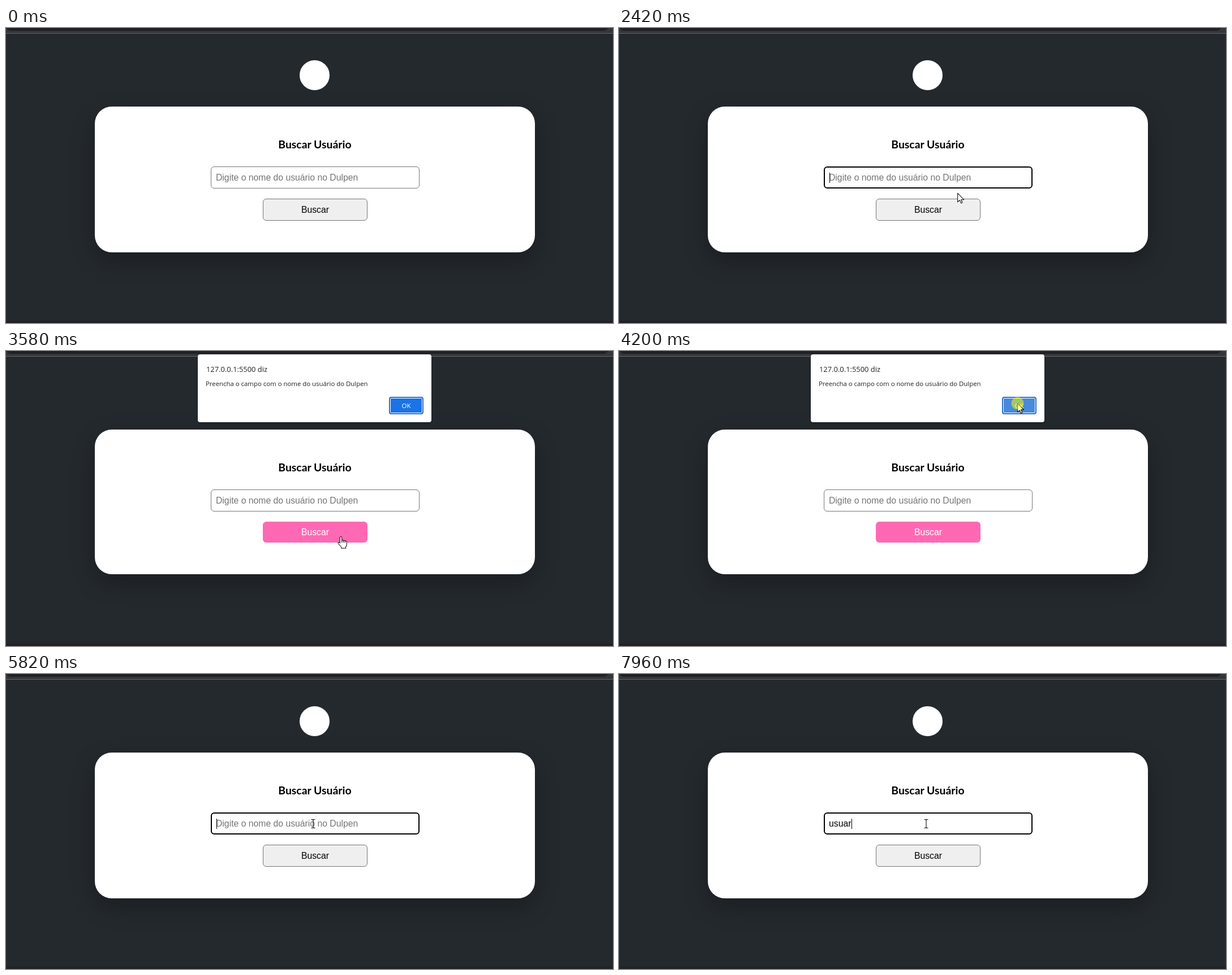
These frames come from a looping animation (1073 px wide and 522 px high, 8 s). An HTML page with a canvas:

```html
<!DOCTYPE html>
<html lang="pt-BR">
<head>
<meta charset="utf-8">
<title>Buscar Usuário</title>
<style>
  html, body { margin: 0; width: 100%; height: 100%; overflow: hidden; background: #24292e; }
  #stage { position: relative; width: 1073px; height: 522px; overflow: hidden; }
  #stage * { position: absolute; box-sizing: border-box; white-space: pre; }
  #toolbar { left: 0; top: 0; width: 1073px; height: 10px; background: #35363a; border-bottom: 1px solid #67686b; }
  #address { left: 0; top: -20px; width: 1065px; height: 25px; border-radius: 0 0 9px 9px; background: #202124; }
  #footer { left: 0; top: 518px; width: 1073px; height: 4px; background: #202226; }
  #logo { left: 519px; top: 57px; width: 53px; height: 53px; border-radius: 50%; background: #fff; }
  #card { left: 157px; top: 139px; width: 778px; height: 258px; border-radius: 30px; background: #fff;
    box-shadow: 0 15px 40px rgba(0, 0, 0, .27); }
  #card.hover { height: 256px; }
  #title { left: 157px; top: 192px; width: 778px; text-align: center; color: #000;
    font: 700 19.4px/28px Lato, sans-serif; }
  #field, #button { border: 1px solid #767676; border-radius: 6px;
    font: 15.75px/37px "Liberation Sans", Arial, sans-serif; }
  #field { left: 362px; top: 245px; width: 369px; height: 39px; background: #fff; }
  #field.focus { border: 2px solid #000; }
  #text { left: 371px; top: 246px; color: #757575; font: 15.75px/37px "Liberation Sans", Arial, sans-serif; }
  #text.typed { color: #000; }
  #caret { top: 256px; width: 1px; height: 18px; background: #000; }
  #button { left: 454px; top: 302px; width: 185px; height: 39px; background: #efefef; color: #000; text-align: center; }
  #button.hover { height: 37px; border: 0; background: #ff69b4; color: #fff; }
  #dialog { left: 339px; top: 6px; width: 413px; height: 120px; border-radius: 4px; background: #fff; color: #202124;
    box-shadow: 0 1px 3px rgba(0, 0, 0, .35); font-family: "Open Sans", "Noto Sans", sans-serif; }
  #host { left: 15px; top: 16px; font-size: 12.9px; line-height: 20px; }
  #message { left: 14px; top: 43px; font-size: 11.4px; line-height: 18px; }
  #ok { left: 338px; top: 75px; width: 61px; height: 31px; border: 2px solid #2a70cb; border-radius: 4px;
    box-shadow: inset 0 0 0 1px #fff; background: #1a73e8; color: #fff; text-align: center;
    font-size: 11.5px; line-height: 27px; }
  #ok.hover { background: #4889da; }
  #pointer { left: 0; top: 0; }
</style>
</head>
<body>
<div id="stage">
  <div id="toolbar"></div><div id="address"></div><div id="footer"></div>
  <div id="logo"></div>
  <div id="card"></div>
  <div id="title">Buscar Usuário</div>
  <div id="field"></div>
  <div id="text"></div>
  <div id="caret"></div>
  <div id="button">Buscar</div>
  <div id="dialog">
    <div id="host">127.0.0.1:5500 diz</div>
    <div id="message">Preencha o campo com o nome do usuário do Dulpen</div>
    <div id="ok">OK</div>
  </div>
  <canvas id="pointer" width="1073" height="522"></canvas>
</div>
<script>
const LOOP = 8000, TICK = 68.5;
const PLACEHOLDER = "Digite o nome do usuário no Dulpen";
const el = id => document.getElementById(id);
const ctx = el("pointer").getContext("2d");

// Each move is a list of [time, x, y]
const moves = [
  [[520, 972, 444], [660, 900, 405], [800, 770, 335], [940, 655, 275], [1068, 606, 253], [1136, 602, 251], [1205, 603, 263]],
  [[2070, 603, 265], [2270, 602, 276], [2480, 597, 300], [2620, 593, 324], [2755, 591.5, 332]],
  [[3580, 592, 328], [3720, 605, 280], [3860, 645, 195], [4000, 685, 120], [4128, 704, 95], [4196, 704.5, 92.5], [4333, 705, 95]],
  [[4410, 704, 102], [4547, 692, 220], [4615, 662, 312], [4684, 600, 288], [4752, 546, 266], [4890, 543, 265]]
];
const clicks = [1136, 2980, 4196, 4752];
const caretFlips = [1136, 1670, 2200, 2730, 4752, 5290, 5820, 7030, 7230, 7760, 7890];
const keys = [6350, 6480, 7230, 7890, 7960];

const between = (t, a, b) => t >= a && t < b;
const countPast = (times, t) => times.filter(x => x <= t).length;
const inside = (p, x, y, w, h) => p.x >= x && p.x < x + w && p.y >= y && p.y < y + h;

function pointerAt(t) {
  const path = moves.filter(m => m[0][0] <= t).pop();
  if (!path) return null;
  const start = path[0][0];
  const time = start + Math.floor((t - start) / TICK + 1e-6) * TICK;
  const i = path.findIndex(p => p[0] > time);
  if (i < 0) {
    const end = path[path.length - 1];
    return { x: end[1], y: end[2] };
  }
  const a = path[i - 1], b = path[i], k = (time - a[0]) / (b[0] - a[0]);
  return { x: a[1] + (b[1] - a[1]) * k, y: a[2] + (b[2] - a[2]) * k };
}

const arrow = new Path2D("M0 0V15.6L3.6 12.3L6 17.6L8.4 16.5L6.1 11.4H11Z");
const hand = new Path2D("M-1.6 9V2Q-1.6 .5 0 .5Q1.6 .5 1.6 2V7Q3 5.8 4.4 7.4Q6 6.6 7.2 8.2Q10.4 7.6 10.4 10.4V14Q10.4 17 8.6 18.6V21H.8V19L-4.6 13Q-5.6 11.4-4.4 10.6Q-3 10-1.6 12Z");
const fingers = new Path2D("M1.6 6.5V11M4.4 7.5V11M7.2 8.5V11.5");
const beam = new Path2D("M-3.5-7.5H-1L0-6.5L1-7.5H3.5M0-6.5V6.5M-3.5 7.5H-1L0 6.5L1 7.5H3.5");

function drawPointer(p, kind, pressed) {
  ctx.clearRect(0, 0, 1073, 522);
  if (!p) return;
  ctx.save();
  ctx.translate(p.x, p.y);
  ctx.lineJoin = "round";
  ctx.lineWidth = 1.1;
  ctx.strokeStyle = "#111";
  ctx.fillStyle = "#fff";
  if (kind === "beam") {
    ctx.stroke(beam);
  } else {
    const shape = kind === "hand" ? hand : arrow;
    ctx.fill(shape);
    ctx.stroke(shape);
    if (kind === "hand") ctx.stroke(fingers);
  }
  if (pressed) {
    ctx.fillStyle = "rgba(255, 255, 0, .5)";
    ctx.beginPath();
    ctx.arc(0, 0, 11, 0, Math.PI * 2);
    ctx.fill();
  }
  ctx.restore();
}

function pointerKind(p, alerting) {
  if (alerting) return p.y < 126 ? "arrow" : "hand";
  if (inside(p, 362, 245, 369, 39)) return "beam";
  return inside(p, 454, 302, 185, 39) ? "hand" : "arrow";
}

function render(t) {
  const p = pointerAt(t);
  const alerting = between(t, 3050, 4265);
  const hover = alerting || !!p && inside(p, 454, 302, 185, 39);
  const focus = between(t, 1136, 2980) || t >= 4752;
  const typed = "usuar".slice(0, countPast(keys, t));

  el("card").classList.toggle("hover", hover);
  el("button").classList.toggle("hover", hover);
  el("field").classList.toggle("focus", focus);
  el("dialog").style.display = alerting ? "block" : "none";
  el("ok").classList.toggle("hover", !!p && inside(p, 677, 81, 61, 31));

  const text = el("text");
  text.textContent = typed || PLACEHOLDER;
  text.classList.toggle("typed", !!typed);
  const width = typed ? text.getBoundingClientRect().width : 0;
  const caret = el("caret").style;
  caret.left = Math.round(371.6 + width) + "px";
  caret.display = focus && countPast(caretFlips, t) % 2 ? "block" : "none";

  const pressed = clicks.some(c => between(t, c, c + TICK));
  drawPointer(p, p && pointerKind(p, alerting), pressed);
}

const began = performance.now();
function loop() {
  render((performance.now() - began) % LOOP);
  requestAnimationFrame(loop);
}
loop();
</script>
</body>
</html>
```
